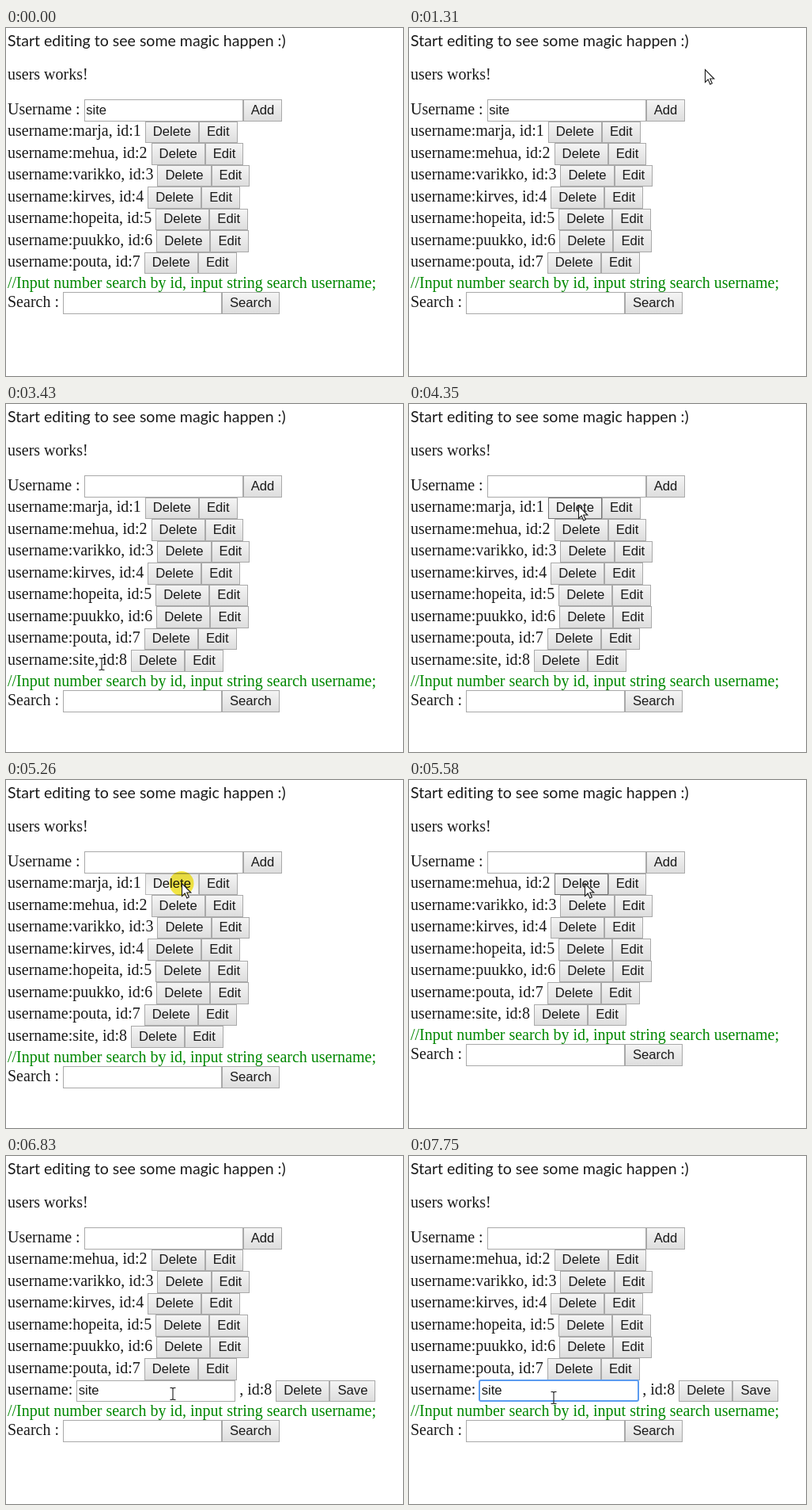
Animation of 502x439 px, one loop 8 s. Source, as an HTML page:

```html
<!DOCTYPE html>
<html lang="en">
<head>
<meta charset="utf-8">
<title>User list</title>
<style>
  html, body { margin: 0; width: 100%; height: 100%; overflow: hidden; background: #fff; }
  svg { display: block; width: 502px; height: 439px; }
  text { white-space: pre; fill: #1a1a1a; }
  .serif { font: 20px "Liberation Serif", "Times New Roman", serif; }
  .sans { font: 16.667px "Liberation Sans", Arial, sans-serif; }
  .title { font: 19.56px Lato, sans-serif; font-variant-ligatures: none; }
  .note { fill: #008700; }
  .click { fill: #fbee46; mix-blend-mode: multiply; }
</style>
</head>
<body>
<svg id="stage" viewBox="0 0 502 439" xmlns="http://www.w3.org/2000/svg"></svg>
<script>
const LOOP = 8000, CLICK = 150;
const TYPED = 1860, ADDED = 2490, DELETED = 5500, EDITING = 6676, FOCUSED = 7150, BLINK = 600;
const LEFT = 2, GAP = 5, PAD = 20, FIELD = 201, ROW = 27.5, FIRST_ROW = 117.5;

const names = ['marja', 'mehua', 'varikko', 'kirves', 'hopeita', 'puukko', 'pouta', 'site'];
const newName = names.at(-1);
const clicks = [1780, 5180, 6600, FOCUSED];

// pointer glides: start, end, x, y
const entry = { x: 283, y: 425 };
const glides = [
  [440, 700, 352, 350], [700, 1160, 374, 52], [1310, 1630, 322, 108],
  [2330, 2410, 311, 120], [2410, 3110, 118, 330], [3190, 3430, 121, 328],
  [3430, 3950, 262, 140], [4030, 4340, 214, 128], [4360, 4580, 207, 287],
  [4580, 4800, 222, 130], [5820, 6200, 239, 287], [6300, 6430, 240, 294],
  [6680, 6980, 183, 305]
];

const stage = document.getElementById('stage');
const pen = document.createElement('canvas').getContext('2d');
const fonts = {
  serif: '20px "Liberation Serif", "Times New Roman", serif',
  sans: '16.667px "Liberation Sans", Arial, sans-serif'
};

function measure(cls, s) {
  pen.font = fonts[cls];
  return pen.measureText(s).width;
}

const between = (t, a, b) => t >= a && t < b;
const inside = (p, b) => between(p.x, b.x, b.x + b.w) && between(p.y, b.y, b.y + b.h);
const label = (cls, x, y, s) => `<text class="${cls}" x="${x}" y="${y}">${s}</text>`;

function pointerAt(t) {
  if (t < glides[0][0]) return null;
  let { x, y } = entry;
  for (const [start, end, toX, toY] of glides) {
    if (t < start) break;
    const k = Math.min(1, (t - start) / (end - start));
    x += (toX - x) * k;
    y += (toY - y) * k;
  }
  return { x: Math.round(x), y: Math.round(y) };
}

// Snaps the edges of a box to whole pixels.
function snap(x, y, w, h) {
  const left = Math.round(x), top = Math.round(y);
  return { x: left, y: top, w: Math.round(x + w) - left, h: Math.round(y + h) - top };
}

function frameRect(b, fill, stroke) {
  return `<rect x="${b.x + .5}" y="${b.y + .5}" width="${b.w - 1}" height="${b.h - 1}" fill="${fill}" stroke="${stroke}"/>`;
}

// Lays out text, fields and buttons from left to right on one line.
class Line {
  constructor(y, page) {
    Object.assign(this, { y, page, x: LEFT, base: Math.floor(y) + 19, out: '' });
  }
  text(s) {
    const w = measure('serif', s);
    this.page.beams.push(snap(this.x, this.y, w, ROW));
    this.out += label('serif', this.x, this.base, s);
    this.x += w + GAP;
    return this;
  }
  field(value = '', focused = false) {
    const b = snap(this.x, this.y, FIELD, ROW);
    this.page.beams.push(b);
    this.out += focused
      ? `<rect x="${b.x}" y="${b.y}" width="${b.w}" height="${b.h - 1}" rx="2" fill="#fff" stroke="#5b9bf0" stroke-width="2"/>`
      : frameRect(b, '#fff', '#a9a9a9');
    this.out += label('sans', this.x + 2.5, this.base, value);
    this.x += FIELD;
    return this;
  }
  button(s) {
    const w = measure('sans', s) + PAD, b = snap(this.x, this.y, w, ROW);
    const { pointer: p, pressed, buttons } = this.page;
    const hover = p && inside(p, b);
    const state = !hover ? 'face' : pressed ? 'down' : 'hot';
    const stroke = { face: '#a9a9a9', down: '#b8b8b8', hot: '#757575' }[state];
    buttons.push(b);
    this.out += frameRect(b, `url(#${state})`, stroke) + label('sans', this.x + PAD / 2, this.base, s);
    this.x += w;
    return this;
  }
  space() {
    this.x += GAP;
    return this;
  }
}

function pointerShape({ x, y }, beam) {
  const d = beam
    ? 'M-3.5-7.5h2.5l1 1 1-1h2.5M0-6.5v13M-3.5 7.5h2.5l1-1 1 1h2.5'
    : 'M.5.5v16l3.7-3.6 2.6 6 2.5-1.1-2.6-5.8h5.1z';
  return `<path transform="translate(${x} ${y})" d="${d}" fill="${beam ? 'none' : '#fff'}" stroke="#1a1a1a" stroke-width="1.1"/>`;
}

function scene(t) {
  const p = pointerAt(t);
  const pressed = clicks.some(c => between(t, c, c + CLICK));
  const page = { pointer: p, pressed, buttons: [], beams: [] };
  const first = t < DELETED ? 0 : 1, last = t < ADDED ? 7 : 8;

  const lines = [new Line(90, page).text('Username :').field(t < TYPED ? newName : '').button('Add')];
  let y = FIRST_ROW;
  for (let i = first; i < last; i++, y += ROW) {
    const line = new Line(y, page), id = i + 1;
    if (id === 8 && t >= EDITING)
      line.text('username:').field(newName, t >= FOCUSED).space().text(`, id:${id}`).button('Delete').button('Save');
    else
      line.text(`username:${names[i]}, id:${id}`).button('Delete').button('Edit');
    lines.push(line);
  }
  const foot = Math.round(y);
  lines.push(new Line(foot + 23, page).text('Search :').field().button('Search'));
  page.beams.push({ x: LEFT, y: foot, w: 466, h: 23 });

  let out = label('title', LEFT, 23, 'Start editing to see some magic happen :)') +
    label('serif', LEFT, 65, 'users works!') +
    lines.map(l => l.out).join('') +
    label('serif note', LEFT, foot + 18, '//Input number search by id, input string search username;');
  if (between(t, FOCUSED, FOCUSED + BLINK)) out += '<path d="M118.5 286v19" stroke="#1a1a1a"/>';
  if (p) {
    if (pressed) out += `<circle class="click" cx="${p.x}" cy="${p.y + .5}" r="15.5"/>`;
    const over = b => inside(p, b);
    out += pointerShape(p, !page.buttons.some(over) && page.beams.some(over));
  }
  return out;
}

const shade = (id, top, bottom) => `<linearGradient id="${id}" x2="0" y2="1">
  <stop stop-color="${top}"/><stop offset="1" stop-color="${bottom}"/></linearGradient>`;
stage.innerHTML = `<defs>${shade('face', '#f5f5f5', '#dddddd')}${shade('hot', '#f8f8f8', '#e4e4e4')}
  ${shade('down', '#e9e9e9', '#f8f8f8')}</defs><rect width="502" height="439" fill="#fff"/><g></g>`;
const layer = stage.lastElementChild;
let shown = '';

function frame() {
  const next = scene(performance.now() % LOOP);
  if (next !== shown) layer.innerHTML = shown = next;
  requestAnimationFrame(frame);
}
frame();
</script>
</body>
</html>
```
